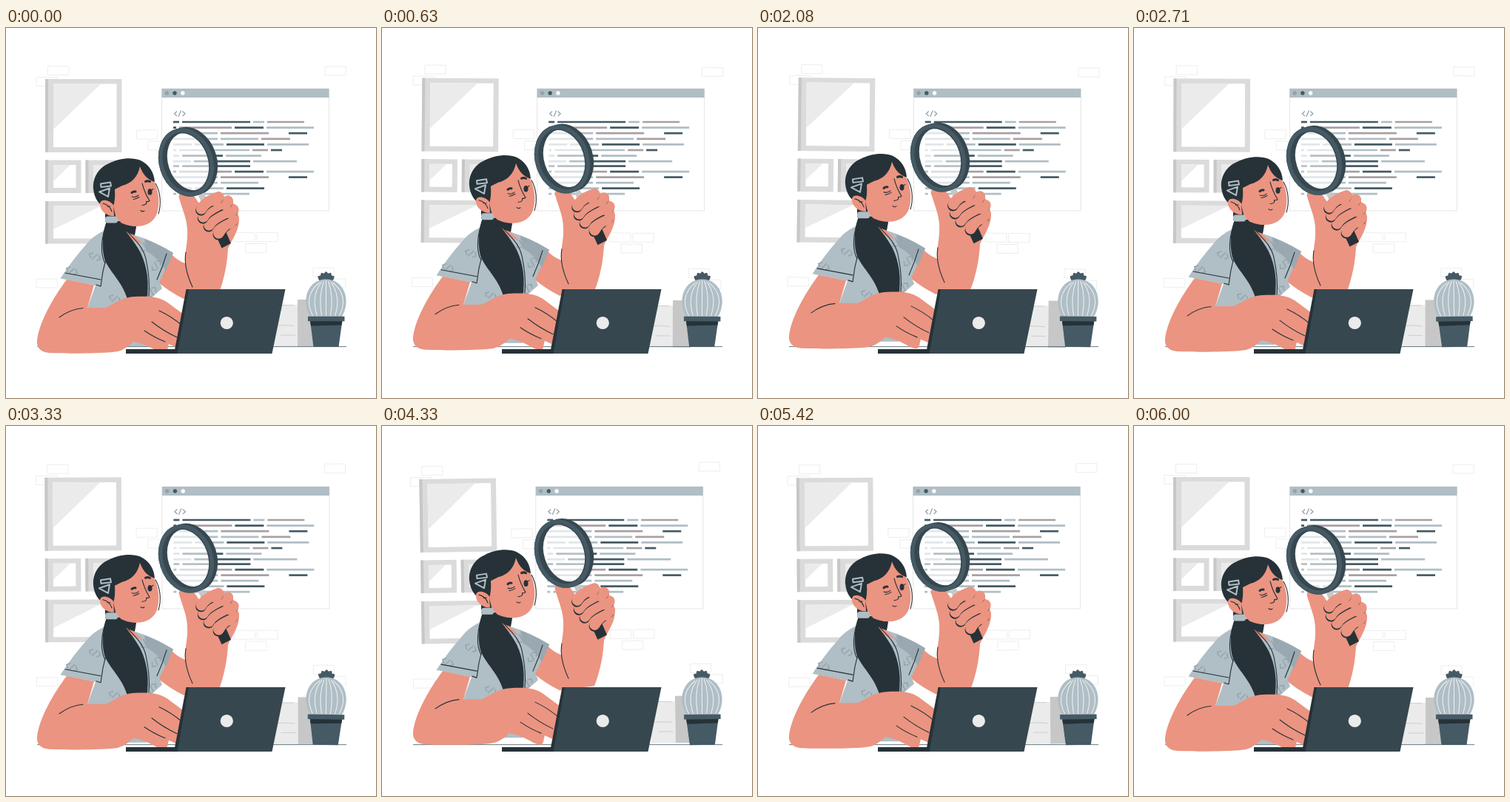
These frames come from a looping animation (500 by 500 pixels, 6.04 s). An HTML page:

```html
<!DOCTYPE html>
<html lang="en">
<head>
<meta charset="utf-8">
<title>Code search</title>
<style>
html, body { margin: 0; width: 100%; height: 100%; overflow: hidden; background: #fff; }
svg { display: block; width: 100%; height: 100%; }
.ink { fill: #263238; }
.skin { fill: #eb9481; }
.shirt { fill: #b0bec5; }
.slate { fill: #37474f; }
.steel { fill: #455a64; }
.pale { fill: #ebebeb; }
.grey { fill: #c7c7c7; }
.line { fill: none; stroke: #263238; stroke-width: 1.1; stroke-linecap: round; stroke-linejoin: round; }
.thick { stroke-width: 3; }
.ring { fill: none; stroke-width: 7; }
#bricks path { fill: none; stroke: #ececec; stroke-width: .9; }
#marks path { fill: none; stroke: #94a4ac; stroke-width: 1.5; }
#code path { stroke-width: 2.7; }
#ribs path { fill: none; stroke: #eef2f3; }
#fingers path { fill: none; stroke-width: 14.5; stroke-linecap: round; }
</style>
</head>
<body>
<svg viewBox="0 0 500 500">
  <g id="wall">
    <g id="bricks"></g>
    <g id="frames"></g>
    <path class="pale" d="M361 374H394V430.5H361Z"/>
    <path class="grey" d="M394 367H418V430.5H394Z"/>
    <path fill="none" stroke="#c7c7c7" stroke-width=".8" d="M365 374.5H389M366 402Q380 401 390 402.5M371 415H391"/>
  </g>

  <g id="window">
    <path d="M210.5 82H436.5V247H210.5Z" fill="#fff" stroke="#e3e3e3" stroke-width=".9"/>
    <path class="shirt" d="M210.5 82H436.5V94H210.5Z"/>
    <circle cx="217.3" cy="88" r="2.7" fill="#92a2aa"/>
    <circle cx="228" cy="88" r="2.7" class="steel"/>
    <circle cx="238.8" cy="88" r="2.7" fill="#fff"/>
    <path fill="none" stroke="#94a4ac" stroke-width="1.3" d="M231 112.5L227.5 115.7L231 119M238.5 112.5L242 115.7L238.5 119M236.5 111.5L233 120"/>
    <g id="code"></g>
  </g>

  <path d="M42 430.6H460" stroke="#455a64" stroke-width=".8"/>

  <g id="cactus">
    <g id="leaves" class="steel"></g>
    <path class="shirt" d="M411 390C398 368 408 339.5 432.5 339.5C457 339.5 467 368 454 390Z"/>
    <g id="ribs"></g>
    <path class="steel" d="M411 395H454.5L449.5 431H415.5Z"/>
    <path class="ink" d="M411 396H454.5L453.7 401.5L412 402.5Z"/>
    <path class="steel" d="M408 389.8H457.5V396.3H408Z"/>
  </g>

  <g id="person">
    <!-- raised arm -->
    <path class="skin" d="M222 304Q231 314 242 318C241 304 246 290 245 274C245 258 237 242 233.5 228C234 222 244 222 250 224C256 227 258 234 262 238L287 221L308 238L315 256C316 272 306 285 300 298C299 318 295 340 287 360L240 366Q220 356 205 343Z"/>
    <path class="line" d="M243 303C240 320 246 337 252 350"/>

    <!-- torso -->
    <path class="shirt" d="M132 274Q116 282 108 293Q90 313 73.5 338.5L121 348L110 378L163 400V430H190L195 366L211 352L207.500 343L226 304Q201 288 174 280Z"/>
    <path fill="#9aa9b1" d="M187 285Q208 293 226 304L216 328Q207 311 190 302Z"/>
    <g id="marks"></g>
    <path class="line" d="M80 331L128 340M217 305Q212 322 204 340M135 312Q130 330 128 349L122 347"/>

    <!-- head -->
    <path class="skin" d="M152 258L177 264L173.5 281L186 292L160 282Z"/>
    <path class="ink" d="M150 260Q162 268 176 268L174 280Q160 276 152 265Z"/>
    <path class="skin" d="M143 236L146 200L180 182L200 207C206 220 208 234 205 247C202 261 191 268 176 268C163 267 152 262 146 254Z"/>
    <path class="ink" d="M134 243C126 239 119 230 118 217C117 202 125 189 139 183C152 176 170 174 182 179C194 185 200 195 201 208Q187 204 181 187C178 202 169 210 157 213L147 218Q148 232 145 241L150 262H134Z"/>
    <path class="skin" d="M145 239C140 232 128 230 127 237C126 246 136 255 146 254Z"/>
    <path class="line" d="M131 237Q140 239 143 248M137 241H141M202 210C209 222 210 238 206 251"/>
    <path fill="none" stroke="#b0bec5" stroke-width="2" stroke-linejoin="round" d="M128 210.5L141 208.5L142 213.5L128.500 215ZM126 221.5L140 216.5L138 228Z"/>
    <path class="line thick" d="M170 222.5Q172 220.5 175 221M188.5 207.5Q191 206 194.5 207.5"/>
    <ellipse class="ink" cx="194.5" cy="221.5" rx="3" ry="4.300"/>
    <path class="line" d="M196 219.5L199 217.5M170 228Q175 229.5 179 226M172 231.5Q176 231 180 228.5M182 246.5Q184.5 249 187 247"/>
    <path class="line" d="M184 210Q187 222 194 233.5Q192 235 189.5 234.5Q191 239 184 239.5"/>

    <!-- ponytail -->
    <path class="ink" d="M136 261C130 276 129 297 133 312C140 330 156 341 164 366L190 368C194 345 191 323 182 304C174 288 161 276 154 261Z"/>
    <path class="line" d="M153 262C165 280 184 290 189 312Q195 340 193 362M137 263C128 282 127 306 134 318"/>
    <rect class="shirt" x="134" y="254.5" width="17" height="9" rx="3.5"/>

    <!-- resting arm -->
    <path class="skin" d="M82 340L119 347.5L110 378H134C146 374 154 364 174 363C192 362 206 363 217 370L240 387L234 418Q233 431 230 431.5L220 427C218 432 219 439 214 439.5C204 439 195 428 172 424Q158 438 144 438C120 440 80 440 58 439C46 438 41 431 42 422C45 397 64 364 82 340Z"/>
    <path class="line" d="M72 391Q87 380 104 378.5M207 382Q224 390 238 402M197 397Q212 409 231 418M187 409Q200 418 215 424"/>

    <!-- magnifier -->
    <g transform="translate(248.5 180) rotate(-18)">
      <ellipse rx="31" ry="41" fill="#fff" opacity=".62"/>
      <ellipse class="ring" rx="33" ry="43.5" stroke="#37474f"/>
    </g>
    <g transform="translate(243.5 181.5) rotate(-18)">
      <ellipse class="ring" rx="33" ry="43.5" stroke="#37474f"/>
      <ellipse class="ring" rx="33.7" ry="44.2" stroke="#455a64" style="stroke-width:5.500"/>
    </g>
    <path class="grey" d="M260 227L267 222.5L275 237L267 241Z"/>
    <path class="ink" d="M284 281L297 275L304 291L291.5 297.5Z"/>
    <g id="fingers"></g>
  </g>

  <path class="ink" d="M162 434H235V440H162Z"/>
  <path class="slate" d="M244.5 353H377.5L359.5 440H228Z"/>
  <path class="ink" d="M243.5 353H247L231.5 440H227Z"/>
  <circle class="pale" cx="298.3" cy="398.500" r="8.600"/>
</svg>
<script>
const $ = id => document.getElementById(id);

function add(parent, d, attrs = {}) {
  const path = document.createElementNS('http://www.w3.org/2000/svg', 'path');
  path.setAttribute('d', d);
  for (const k in attrs) path.setAttribute(k, attrs[k]);
  $(parent).append(path);
}

const box = (x, y, w, h) => `M${x} ${y}h${w}v${h}h${-w}Z`;

// A brick, with a second one a row below on the given side
function bricks(x, y, side) {
  add('bricks', box(x, y, 28.3, 12));
  if (side) add('bricks', box(x + 15.5 * side, y + 15, 28.3, 12));
}
bricks(56.5, 51.5, -1);
bricks(431, 52);
bricks(176.5, 138, 1);
bricks(308, 276.5, 1);
bricks(339, 276.5);
bricks(41, 339);
bricks(415, 324, 1);

function frame(x, y, w, h) {
  const iw = w - 18, ih = h - 13.5;
  add('frames', box(x, y, w, h), { fill: '#dbdbdb' });
  add('frames', box(x, y, 4, h), { class: 'grey' });
  add('frames', box(x + 11, y + 6.5, iw, ih), { fill: '#fff' });
  add('frames', `M${x + 11} ${y + 6.5}h${iw * .75}l${-iw * .75} ${ih * .72}Z`, { class: 'pale' });
}
frame(53, 69, 103.5, 99);
frame(53, 178.5, 48.5, 44.5);
frame(107.5, 178.5, 48.5, 44.5);
frame(53, 234, 103.5, 57.5);

// Code: colour letter and word length, repeated as a second, shorter block
const tint = { d: '#455a64', l: '#b0bec5', m: '#a8a0a2', _: 'none' };
const lines = ['d8 d92 l15 m50', 'd4 m71 d39 l64', 'l60 m65 _19 d25', 'l60 l51 m39',
  'l25 l39 d51 l56', 'l4 l95 m21 d15', 'l8 d55 l48', 'l24 d76 l59'];

function codeLine(words, y, end) {
  let x = 226;
  for (const word of words.split(' ')) {
    const length = +word.slice(1);
    if (x < end) add('code', `M${x} ${y}h${length}`, { stroke: tint[word[0]] });
    x += length + 4;
  }
}
lines.forEach((words, i) => codeLine(words, 127 + 7.6 * i, 436));
lines.slice(0, 6).forEach((words, i) => codeLine(words, 186.6 + 7.5 * i, i == 1 || i == 2 ? 436 : 330));

for (const [x, y] of [[120, 309], [89, 328], [147, 366], [188, 295], [203, 321], [197, 357]])
  add('marks', 'M-4-4L-8 0L-4 4M4-4L8 0L4 4M2-5L-2 5', { transform: `translate(${x} ${y}) rotate(${x > 185 ? -50 : 25})` });

for (let i = -2; i <= 2; i++)
  add('leaves', 'M0 0Q-8-7 0-13Q8-7 0 0', { transform: `translate(432.5 342) rotate(${30 * i})` });

for (let i = -3; i <= 3; i++)
  add('ribs', `M${432.5 + i * 3} ${341 + Math.abs(i)}Q${432.5 + i * 10.5} 362 ${432.5 + i * 6} 389`);

// Fingers run from tips along a curve to knuckles on a circle; each casts a dark edge
for (let i = 3; i >= 0; i--) {
  const x = 264 + 2.6 * i * i, y = 244.5 + 11 * i;
  const a = (35 * i - 85) * Math.PI / 180;
  const kx = 285 + 23 * Math.cos(a), ky = 251.5 + 23 * Math.sin(a);
  const bend = `Q${x + 5} ${y - 10} ${kx} ${ky}`;
  add('fingers', `M${x} ${y}${bend}`, { stroke: '#263238', transform: 'translate(-.6 1.8)' });
  add('fingers', `M${x} ${y}${bend}M${kx} ${ky}l-4 5`, { stroke: '#eb9481' });
  add('fingers', `M${kx} ${ky}l-3 4`, { stroke: '#eb9481' });
}

const LOOP = 6040;
const phase = (t, period) => t % period / period;
const wind = p => p < .25 ? 4 * p : p < .75 ? 2 - 4 * p : 4 * p - 4;
const float = p => -10 * (1 - Math.abs(1 - 2 * p));
// Alternating jolts that double up to 4 px and die away again
const jolt = i => (-1) ** i * Math.min(4, Math.floor(2 ** (Math.min(i, 10 - i) - 1)));
function shake(p) {
  const i = Math.floor(p * 10);
  return jolt(i) + (jolt(i + 1) - jolt(i)) * (p * 10 - i);
}
const move = (id, value) => $(id).setAttribute('transform', value);

function draw(now) {
  const t = now % LOOP;
  move('wall', `rotate(${wind(phase(t, 6000))} 250 242)`);
  move('window', `translate(${shake(phase(t, 6000))})`);
  move('cactus', `rotate(${wind(phase(t, 1500))} 432.5 380)`);
  move('person', `translate(0 ${float(phase(t, 3000))})`);
  requestAnimationFrame(draw);
}
draw(performance.now());
</script>
</body>
</html>
```
